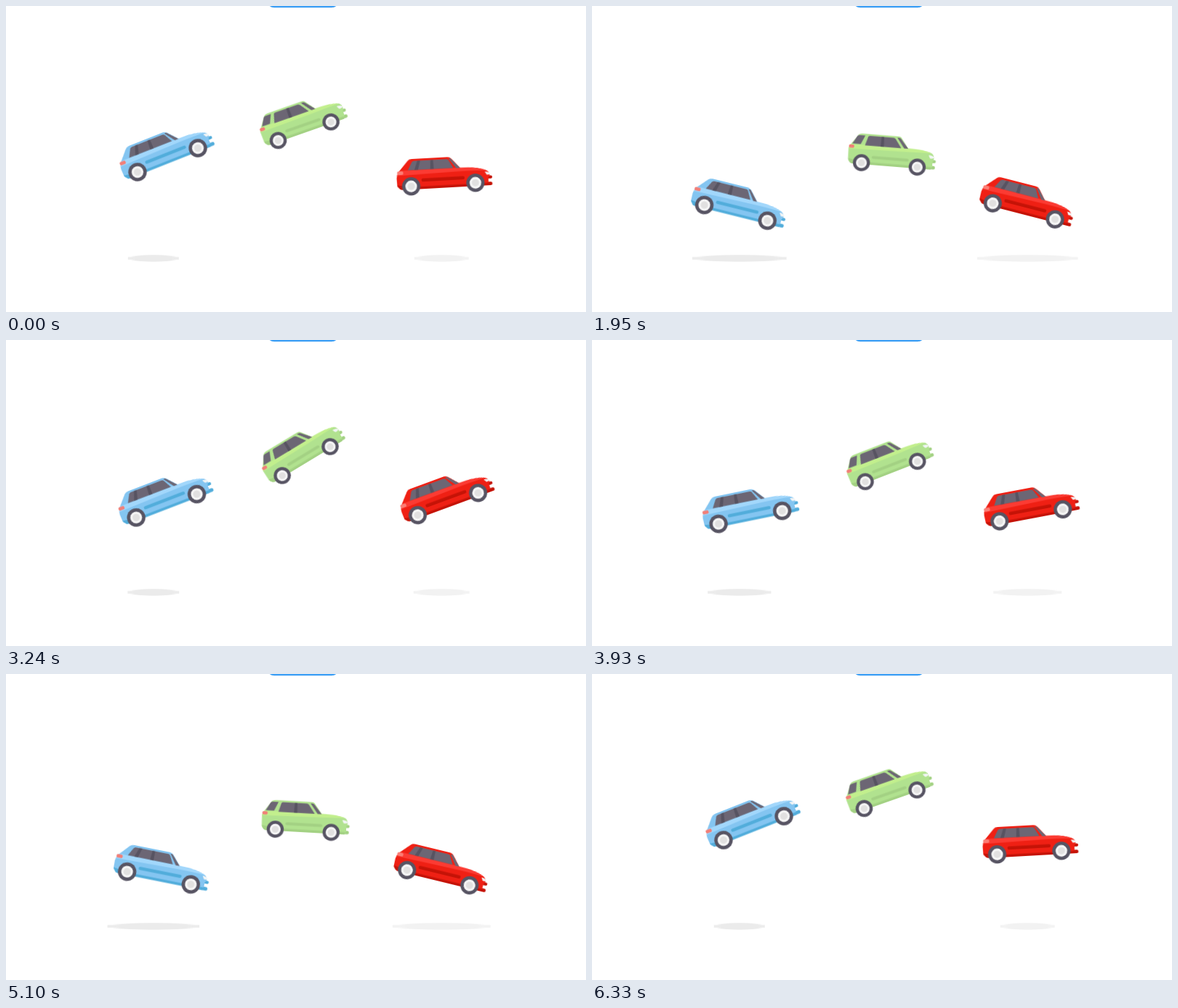
An HTML page that plays this animation: 798 by 422 pixels, repeating every 6360 ms.

```html
<!DOCTYPE html>
<html lang="en">
<head>
<meta charset="utf-8">
<title>Bouncing cars</title>
<style>
  html, body { margin: 0; width: 100%; height: 100%; overflow: hidden; background: #fff; }
  svg { display: block; width: 798px; height: 422px; }
  svg g, svg ellipse { transform-origin: 0 0; transform-box: view-box; }
  .glass { fill: #6c6674; }
  .post { fill: #575361; }
  .lamp { fill: #f2f5f6; }
  .blue { --main: #84c5f1; --light: #a2d7fb; --dark: #52addb; --tail: #f17f78; }
  .red { --main: #ef2014; --light: #fb3b33; --dark: #c51307; --tail: #fb7d74; }
  .green { --main: #b1e28f; --light: #c2ef8d; --dark: #a3d183; --tail: #f08078; }
  .main { fill: var(--main); }
  .light { fill: var(--light); }
  .dark { fill: var(--dark); }
  .tail { fill: var(--tail); }
</style>
</head>
<body>
<svg viewBox="0 0 798 422" xmlns="http://www.w3.org/2000/svg">
  <defs>
    <g id="wheel">
      <circle r="12.7" fill="#575463"/>
      <circle r="8.1" fill="#f6f6f6"/>
      <circle r="5" fill="#e1e0e0"/>
    </g>
    <g id="sedan">
      <rect class="dark" x="54" y="-9.3" width="14.4" height="4.4" rx="2"/>
      <rect class="dark" x="50" y="-.4" width="18.2" height="4.9" rx="2"/>
      <path class="main" d="M-64-2L-64.3-12Q-64-17-61-21L-48-35.5Q-46-38-42-38H7Q11-38 14-34.5L25-21.7Q50-22 61-16.5Q65-14 65-10L63-6V0L60 2H-60Q-64 1-64-2Z"/>
      <path class="dark" d="M-64-2.5Q-50 0-30 .8H62V4.5H-56Q-61 4.5-62 1Z"/>
      <path class="light" d="M-61-21L-59-22.3H24Q50-22.3 61-16.5Q50-17.6 24-17.2L-63.6-15.5Z"/>
      <rect class="dark" x="-30" y="-10.2" width="60" height="4.4" rx="2"/>
      <path class="glass" d="M-48.2-22.5L-42.2-33.5Q-41-35.2-39-35.2H6Q8-35.2 9-33.5L15-22.3Z"/>
      <path class="post" d="M-39-22.5L-34.4-35.2H-30.4L-34-22.5ZM-17-22.5L-16-35.2H-12.4L-12-22.5Z"/>
      <path class="glass" d="M9.2-36H11Q12-36 13-34.8L24.6-21.8H19.2Z"/>
      <rect class="tail" x="-63.2" y="-21.6" width="8.4" height="4.8" rx="1.6"/>
      <path class="lamp" d="M58.5-14.8Q63-15.4 66-12Q65-9.8 61-10.6Z"/>
      <use href="#wheel" x="-44.7"/>
      <use href="#wheel" x="44.7"/>
    </g>
    <g id="hatch">
      <rect class="dark" x="50" y="-11.4" width="13.4" height="4.2" rx="2"/>
      <rect class="dark" x="46" y="-3.2" width="16.8" height="4.6" rx="2"/>
      <path class="main" d="M-57.4-4L-57.8-19Q-57-23-54-26L-46-37.5Q-44-40.3-40-40.3H10Q13-40.3 15-37L24.5-24.2Q48-24.4 57-20.4Q60.5-18 60.5-13L59-8V-2L55 1H-52Q-57 0-57.4-4Z"/>
      <path class="dark" d="M-57.3-5Q-45-2-25-1.6H57V2H-50Q-54 2-55 0Z"/>
      <path class="light" d="M-55-24.8H24Q48-24.8 57-20.4Q46-20.6 24-19.8L-57.8-18.5Q-57-22-55-24.8Z"/>
      <rect class="dark" x="-25" y="-10.6" width="51" height="4" rx="2"/>
      <path class="glass" d="M-53-25.5L-47-36Q-46-37.8-44-37.8H-36L-41.5-25.5Z"/>
      <path class="glass" d="M-35.5-24.3L-32-36.3Q-31.4-37.8-30-37.8H3Q5-37.8 6-36.2L14.5-24.3Z"/>
      <path class="post" d="M-14-24.3L-13.5-37.8H-10L-9.5-24.3Z"/>
      <path class="glass" d="M8.2-38.3H11Q12.6-38.3 13.6-36.8L24.2-24.2H18.6Z"/>
      <rect class="tail" x="-57.4" y="-24" width="7.2" height="4.4" rx="1.6"/>
      <path class="lamp" d="M53-17.6Q58-18.2 61-15Q59.5-12.6 55-13.6Z"/>
      <use href="#wheel" transform="translate(-38.5) scale(.925)"/>
      <use href="#wheel" transform="translate(38.5) scale(.925)"/>
    </g>
  </defs>
  <rect x="359" y="-38" width="99" height="40.3" rx="10" fill="#3d9ff5"/>
  <ellipse id="blueShade" rx="1" ry="4.7" fill="#ebebeb"/>
  <ellipse id="redShade" rx="1" ry="4.7" fill="#f2f2f2"/>
  <g id="blue" class="blue"><use href="#sedan"/></g>
  <g id="green" class="green"><use href="#hatch"/></g>
  <g id="red" class="red"><use href="#sedan" transform="scale(.99)"/></g>
</svg>
<script>
  const LOOP = 6360;

  // Start and end of each swing: down, up, down, up.
  const swings = [[20, 1700], [1820, 3380], [3460, 4740], [4790, LOOP]];
  const redSwings = [[20, 1920], [1930, 3380], [3460, 4740], [4790, LOOP]];

  const carPose = ([x, y, deg]) => `translate(${x}px, ${y}px) rotate(${deg}deg)`;
  const shadePose = x => ([width]) => `translate(${x}px, 348px) scaleX(${width / 2})`;

  // Poses alternate high, low, high, low; each is held until the next swing.
  function play(id, poses, toTransform, times = swings) {
    const frames = [{ offset: 0, transform: toTransform(poses[0]), easing: 'linear' }];
    times.forEach(([start, end], i) => {
      const next = poses[(i + 1) % poses.length];
      frames.push(
        { offset: start / LOOP, transform: toTransform(poses[i]), easing: 'ease-in-out' },
        { offset: end / LOOP, transform: toTransform(next), easing: 'linear' }
      );
    });
    document.getElementById(id).animate(frames, { duration: LOOP, iterations: Infinity });
  }

  play('blue', [[222.5, 212.5, -21.7], [197.6, 286.1, 14.5], [221.2, 227.8, -21.7], [209.4, 287.4, 14.2]], carPose);
  play('green', [[410.8, 172.7, -19.4], [409, 219.9, 5.1], [413.1, 166.2, -31.8], [408.7, 220, 5.2]], carPose);
  play('red', [[601.7, 246.3, -3.2], [594.2, 283.2, 14.5], [608.3, 225.2, -20.9], [594.1, 284, 15.2]], carPose, redSwings);
  play('blueShade', [[70], [130.5], [70], [131.5]], shadePose(202.8));
  play('redShade', [[75], [139.5], [76], [140]], shadePose(599.2));
</script>
</body>
</html>
```
